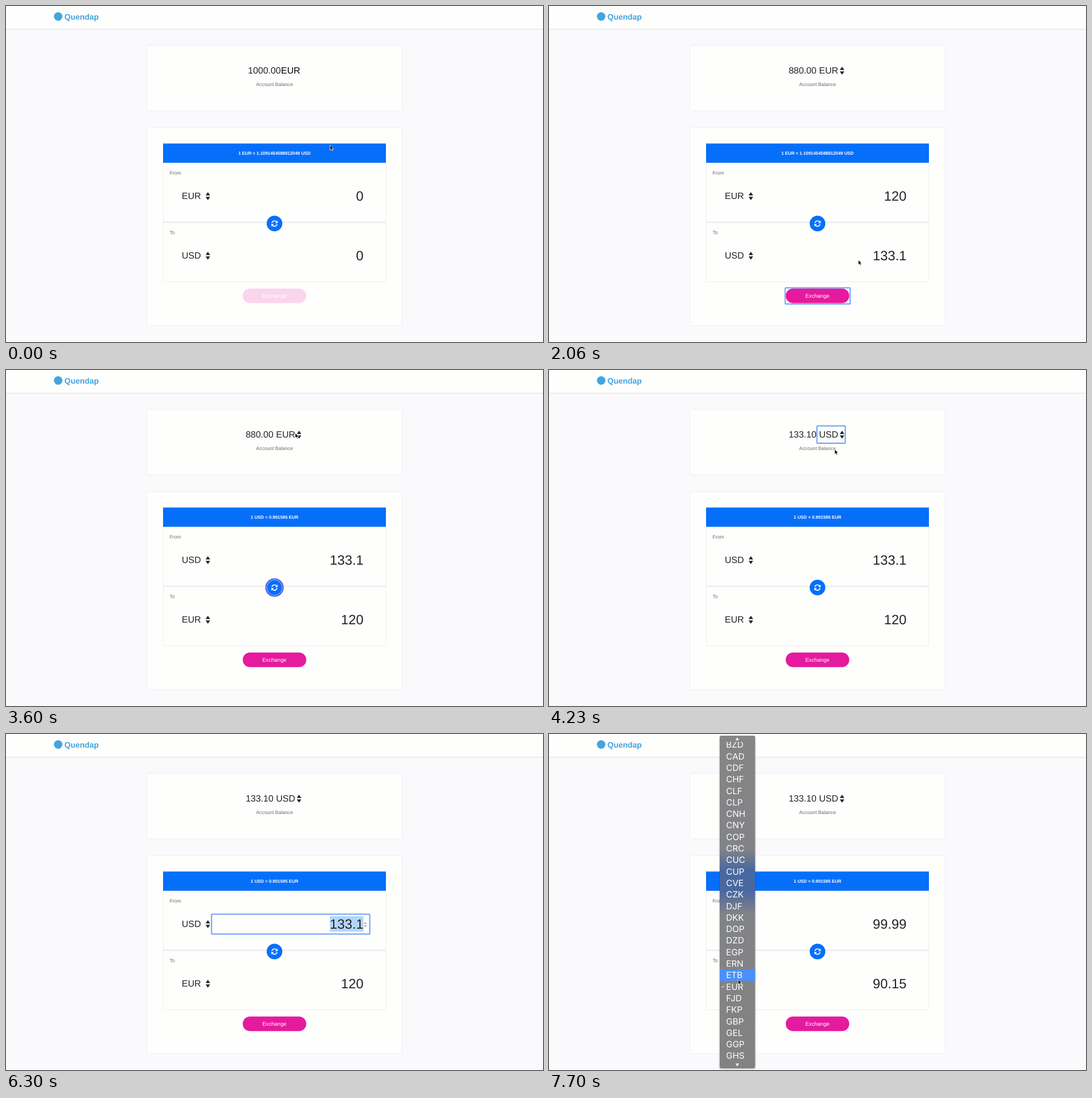
Recreate the animation shown at these times as an HTML page. Size 947 px wide and 592 px high, loop 8 s.

```html
<!DOCTYPE html>
<html lang="en">
<head>
<meta charset="utf-8">
<title>Currency exchange</title>
<style>
  html, body { margin: 0; width: 100%; height: 100%; overflow: hidden; background: #fafafd; }
  svg { display: block; width: 947px; height: 592px; font-family: "Liberation Sans", Arial, sans-serif; text-rendering: geometricPrecision; }
  .card { fill: #fefefd; stroke: #f0f0f3; }
  .small { font-size: 8.66px; fill: #6b6b6f; }
  .mid { font-size: 16px; fill: #212326; }
  .big { font-size: 23.7px; fill: #212326; text-anchor: end; }
  .rate { font-size: 7.88px; font-weight: bold; fill: #fff; }
  .center { text-anchor: middle; }
  .ring { fill: none; stroke: #6d9df6; stroke-width: 2; }
  .menu text { font: 15.3px Inter, "Open Sans", sans-serif; fill: #fff; }
  .brand { font-size: 14px; font-weight: bold; fill: #43a5df; }
</style>
</head>
<body>
<svg viewBox="0 0 947 592">
  <defs>
    <path id="sort" d="M-4 -1.2L0 -7L4 -1.2ZM-4 1.2L0 7L4 1.2Z" fill="#212326"/>
    <linearGradient id="glass" gradientUnits="userSpaceOnUse" x1="0" y1="3" x2="0" y2="589">
      <stop offset="0" stop-color="#858585"/>
      <stop offset=".34" stop-color="#828386"/>
      <stop offset=".405" stop-color="#4a67a0"/>
      <stop offset=".465" stop-color="#4a67a0"/>
      <stop offset=".535" stop-color="#828386"/>
      <stop offset="1" stop-color="#828282"/>
    </linearGradient>
    <filter id="shadow" x="-20%" y="-10%" width="140%" height="120%">
      <feDropShadow dx="0" dy="1" stdDeviation="1.7" flood-opacity=".3"/>
    </filter>
    <clipPath id="menuClip"><rect x="301" y="14" width="63" height="563"/></clipPath>
  </defs>

  <rect width="947" height="592" fill="#fafafd"/>
  <rect width="947" height="41" fill="#fefefd"/>
  <rect y="40.3" width="947" height="1.3" fill="#e5e5e8"/>
  <circle cx="92" cy="18.5" r="7.5" fill="#43a5df"/>
  <text class="brand" x="103" y="23.5">Quendap</text>

  <rect class="card" x="248.5" y="69.5" width="450" height="115"/>
  <rect class="card" x="248.5" y="214.5" width="450" height="349"/>
  <text id="balance" class="mid" y="119" text-anchor="end"></text>
  <text id="account" class="mid" y="119"></text>
  <use id="accountSort" href="#sort" x="516.8" y="114"/>
  <text class="small center" x="473.5" y="141">Account Balance</text>

  <path d="M277.5 276V483a3 3 0 0 0 3 3H667a3 3 0 0 0 3-3V276" fill="none" stroke="#ededf0"/>
  <rect x="277" y="242.3" width="393" height="34" fill="#066ffa"/>
  <text id="rate" class="rate center" x="473.5" y="262"></text>
  <rect x="277" y="380.3" width="393" height="1.4" fill="#e3e3e6"/>
  <text class="small" x="288.5" y="297">From</text>
  <text class="small" x="288.5" y="402">To</text>
  <text id="fromCode" class="mid" x="310" y="340"></text>
  <text id="toCode" class="mid" x="310" y="445"></text>
  <use href="#sort" x="356" y="335"/>
  <use href="#sort" x="356" y="440"/>

  <rect id="selection" y="321" height="27" fill="#b5d6fb"/>
  <text id="fromValue" class="big" x="630.4" y="342.8"></text>
  <text id="toValue" class="big" x="630.4" y="447.8"></text>
  <rect id="caret" y="321" width="1" height="27" fill="#212326"/>
  <g id="spinner">
    <rect x="631" y="331" width="5.5" height="10" rx="2" fill="#f1f1f1"/>
    <path d="M632.2 334.4l1.5-1.8 1.5 1.8M632.2 337.4l1.5 1.8 1.5-1.8" fill="none" stroke="#555" stroke-width=".9"/>
  </g>
  <rect id="inputRing" class="ring" x="362.5" y="317.5" width="279" height="35" rx="1"/>
  <rect id="accountRing" class="ring" x="472.5" y="98.5" width="50" height="30.5" rx="1"/>

  <g transform="translate(473.5 383.3)">
    <g id="swapRing" fill="none">
      <circle r="15.6" stroke="#c9c4fa" stroke-width="2.6"/>
      <circle r="14.9" stroke="#3a45e0" stroke-width="1.8"/>
      <circle r="13.7" stroke="#a9c6fb" stroke-width="1"/>
    </g>
    <circle id="swapDisc" r="13.8" fill="#066ffa"/>
    <g id="half">
      <path d="M-4.6 -.9A4.7 4.7 0 0 1 3.6 -3.1" fill="none" stroke="#fff" stroke-width="1.7"/>
      <path d="M5.6 -5.4V-.8H1Z" fill="#fff"/>
    </g>
    <use href="#half" transform="rotate(180)"/>
  </g>

  <rect id="button" x="417.5" y="497.8" width="112" height="25.7" rx="12.85"/>
  <text class="center" x="473.3" y="514" font-size="9.6" fill="#fff">Exchange</text>
  <rect id="buttonRing" class="ring" x="416.5" y="496.5" width="114.5" height="28.5" rx="1"/>

  <g id="accountMenu" class="menu">
    <rect x="466" y="100" width="62" height="49" rx="3" fill="#838383" filter="url(#shadow)"/>
    <rect id="accountHover" x="466" width="62" height="20.3" fill="#4990fb"/>
    <path d="M471.5 114l1.5 2 3-4" fill="none" stroke="#fff"/>
    <text x="478" y="119.5">EUR</text>
    <text x="478" y="139.8">USD</text>
  </g>

  <g id="codeMenu" class="menu">
    <rect x="301" y="3" width="62.5" height="586" rx="3" fill="url(#glass)" filter="url(#shadow)"/>
    <rect id="codeHover" x="301" width="62.5" height="20.3" fill="#4990fb"/>
    <g id="codes" clip-path="url(#menuClip)"></g>
    <path d="M304 445l1.7 2 3.2-4.2" fill="none" stroke="#fff"/>
    <path d="M329 11L332 6L335 11ZM329 580.5L332 585.5L335 580.5Z" fill="#fff"/>
  </g>

  <path id="arrow" d="M0 0V8.7L2 6.9L3.4 10L5 9.3L3.6 6.3H6.3Z" fill="#000" stroke="#fff" stroke-width=".8"/>
  <path id="beam" d="M-2 -6.5Q0 -6.5 0 -5.2V5.2Q0 6.5 -2 6.5M2 -6.5Q0 -6.5 0 -5.2M0 5.2Q0 6.5 2 6.5" fill="none" stroke="#555" stroke-width=".8"/>
</svg>
<script>
const LOOP = 8000, ROW = 20.3, FIRST_ROW = 18.7, RIGHT = 630.4;
const $ = id => document.getElementById(id);
const show = (id, on) => $(id).setAttribute('visibility', on ? 'visible' : 'hidden');
const put = (id, attrs) => { for (const k in attrs) $(id).setAttribute(k, attrs[k]); };
const within = (t, ...spans) => spans.some(([a, b]) => t >= a && t < b);
const latest = (track, t) => track.filter(([start]) => t >= start).pop()[1];
const widthOf = s => [...s].reduce((w, c) => w + (c === '.' ? .278 : .556) * 23.7, 0);

'BZD CAD CDF CHF CLF CLP CNH CNY COP CRC CUC CUP CVE CZK DJF DKK DOP DZD EGP ERN ETB EUR FJD FKP GBP GEL GGP GHS'
  .split(' ').forEach((code, i) => {
    const item = document.createElementNS('http://www.w3.org/2000/svg', 'text');
    item.textContent = code;
    item.setAttribute('x', 312.3);
    item.setAttribute('y', FIRST_ROW + i * ROW + 5.6);
    $('codes').append(item);
  });

// Each entry: start time, value
const text = {
  balance: [[0, '1000.00'], [1900, '880.00'], [4000, '133.10']],
  account: [[0, 'EUR'], [3960, 'USD']],
  rate: [[0, '1 EUR = 1.1091454588812049 USD'], [3160, '1 USD = 0.901595 EUR']],
  fromCode: [[0, 'EUR'], [3160, 'USD']],
  toCode: [[0, 'USD'], [3160, 'EUR']],
  fromValue: [[0, '0'], [600, '10'], [1160, '120'], [3160, '133.1'], [6360, '9'], [6430, '99'],
              [6700, '99.'], [6930, '99.9'], [7030, '99.99']],
  toValue: [[0, '0'], [630, '11.09'], [1230, '133.1'], [3160, '120'], [6360, '8.11'], [6430, '89.26'],
            [6930, '90.07'], [7030, '90.15']]
};
const focus = [[0, ''], [300, 'input'], [1860, 'button'], [3160, 'swap'], [3700, ''],
               [3960, 'account'], [5000, 'input'], [7590, '']];

// Pointer path: time, x, y
const path = [[0, 571.5, 245], [30, 571.5, 245], [190, 617, 354], [300, 607, 335], [1500, 607, 335],
  [1820, 502, 509], [1920, 502, 509], [2260, 620, 342], [2490, 620, 342], [2560, 522, 382],
  [2690, 522, 382], [2800, 489.5, 385.5], [3000, 478, 385], [3150, 478, 385], [3600, 510, 111],
  [3740, 512, 114], [3900, 507, 134], [4230, 503.8, 139.8], [4560, 597, 344], [4740, 597, 344],
  [4860, 622, 339], [7250, 622, 339], [7560, 336, 439], [7610, 336, 439], [7700, 333.5, 432.5], [LOOP, 333.5, 432.5]];

function pointer(t) {
  const i = path.findIndex(([end]) => t < end);
  const [t0, x0, y0] = path[i - 1], [t1, x1, y1] = path[i];
  const k = (t - t0) / (t1 - t0), e = k * k * (3 - 2 * k);
  return [x0 + (x1 - x0) * e, y0 + (y1 - y0) * e];
}

function render(t) {
  for (const id in text) {
    const value = latest(text[id], t);
    if ($(id).textContent !== value) $(id).textContent = value;
  }
  const single = t < 1900;
  put('balance', { x: single ? 484.6 : 471.6 });
  put('account', { x: single ? 485 : 476.3, style: single ? 'fill:#000' : '' });
  show('accountSort', !single);
  put('button', { fill: t < 630 ? '#fad5ed' : '#e51a9e' });

  const focused = latest(focus, t);
  for (const name of ['input', 'button', 'swap', 'account']) show(name + 'Ring', focused === name);
  put('swapDisc', { r: focused === 'swap' ? 13.2 : 13.8 });

  const chars = t < 5260 || t >= 6360 ? 0 : Math.min(5, 1 + Math.floor((t - 5260) / 75));
  const marked = chars ? widthOf('133.1'.slice(-chars)) : 0;
  put('selection', { x: RIGHT - marked, width: marked });

  put('caret', { x: t < 4000 ? 616 : 629.6 });
  show('caret', within(t, [300, 600], [900, 1200], [1500, 1800], [5000, 5230], [6360, 6700], [6760, 7260]));

  const [x, y] = pointer(t);
  const inInput = x > 363 && x < 641 && y > 318 && y < 352;
  const hidden = within(t, [600, 1500], [5230, 7260]);
  show('spinner', focused === 'input' || inInput);
  show('arrow', !hidden && !inInput);
  show('beam', !hidden && inInput);
  for (const id of ['arrow', 'beam']) put(id, { transform: `translate(${x} ${y})` });

  show('accountMenu', within(t, [3740, 3960]));
  put('accountHover', { y: t < 3850 ? 103.9 : 124.2 });
  show('codeMenu', t >= 7600);
  put('codeHover', { y: FIRST_ROW + (t < 7670 ? 21 : 20) * ROW - ROW / 2 });
}

let start;
function tick(now) {
  start ??= now;
  render((now - start) % LOOP);
  requestAnimationFrame(tick);
}
render(0);
requestAnimationFrame(tick);
</script>
</body>
</html>
```
